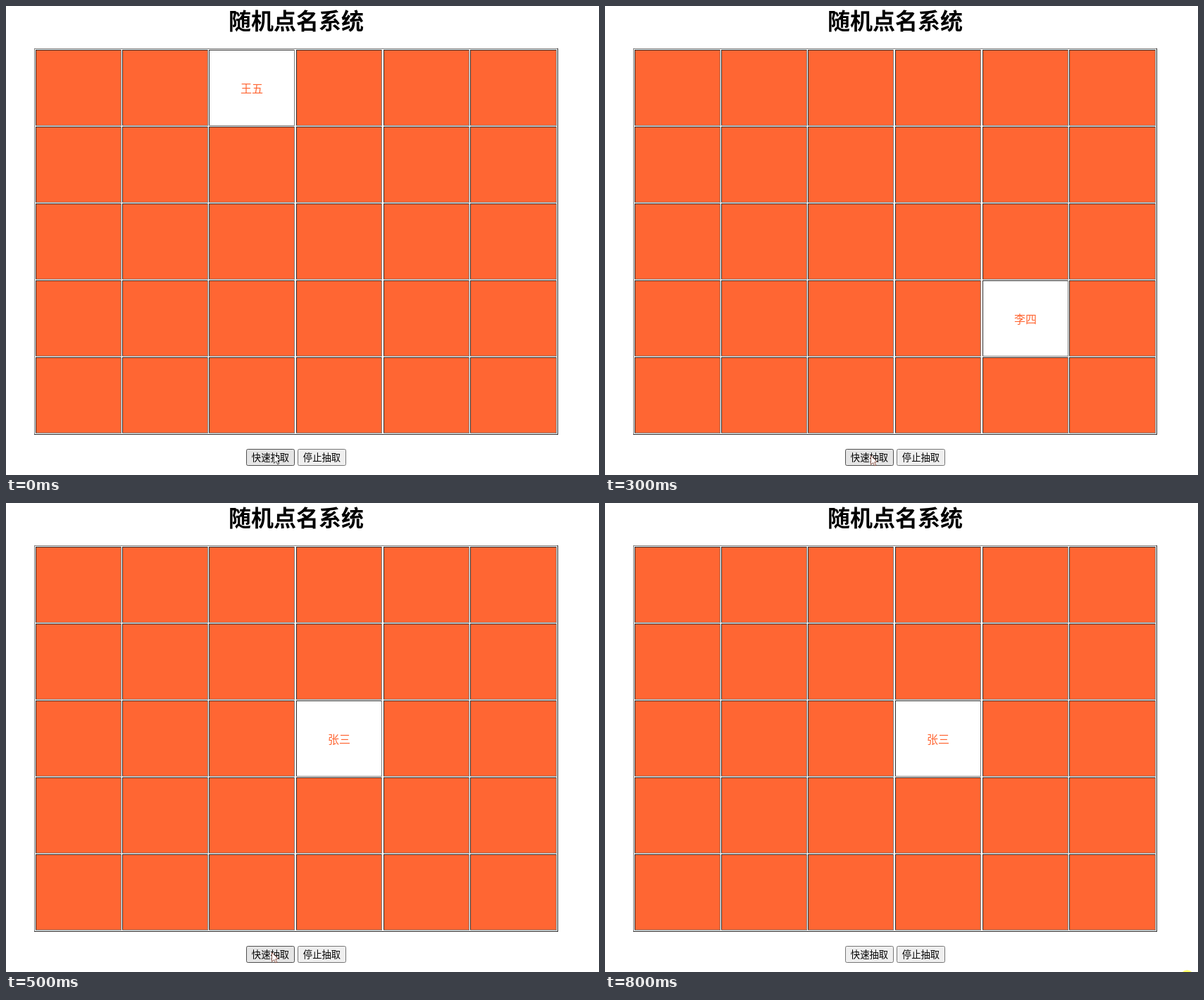
An HTML page with a canvas for the animation above (0.9 s loop, 842x665 px).

```html
<!DOCTYPE html>
<html lang="zh-CN">
<head>
<meta charset="utf-8">
<title>随机点名系统</title>
<style>
  html, body { margin: 0; width: 100%; height: 100%; overflow: hidden; background: #fff; }
  canvas { display: block; }
</style>
</head>
<body>
<canvas id="stage" width="842" height="665"></canvas>
<script>
const ctx = document.getElementById("stage").getContext("2d");
const FONT = '"Noto Sans CJK SC", "Noto Sans CJK", sans-serif';
const ORANGE = "#ff6633", DARK = "#2c2c2c", GRAY = "#808080";
const STEP = 100, LOOP = 900;

const columns = [42, 165, 288, 412, 536, 659];
const names = ["张三", "李四", "王五"];

// The picked cell of each step: [column, row].
const picks = [[2, 0], [1, 2], [2, 1], [4, 3], [3, 1], [3, 2], [2, 3], [4, 3], [3, 2]];

function rect(x, y, w, h, color) {
  ctx.fillStyle = color;
  ctx.fillRect(x, y, w, h);
}

function text(string, x, baseline, size, color, weight = 400) {
  ctx.font = `${weight} ${size}px ${FONT}`;
  ctx.textAlign = "center";
  ctx.fillStyle = color;
  ctx.fillText(string, x, baseline);
}

function bevelBox(x, y, w, h, topLeft, bottomRight, fill) {
  rect(x, y, w, h, bottomRight);
  rect(x, y, w - 1, 1, topLeft);
  rect(x, y, 1, h - 1, topLeft);
  rect(x + 1, y + 1, w - 2, h - 2, fill);
}

function drawTable([pickedColumn, pickedRow]) {
  bevelBox(40, 60, 744, 548, GRAY, DARK, "#fff");
  for (let row = 0; row < 5; row++) {
    columns.forEach((x, column) => {
      const y = 62 + row * 109;
      const width = column === 5 ? 123 : 122;
      const picked = column === pickedColumn && row === pickedRow;
      bevelBox(x, y, width, 108, DARK, GRAY, picked ? "#fff" : ORANGE);
      if (picked) text(names[column % 3], x + 61, y + 60.5, 16, ORANGE);
    });
  }
}

function drawButton(label, x, hovered) {
  ctx.beginPath();
  ctx.roundRect(x + 0.5, 628.5, 68, 23, 2);
  ctx.fillStyle = hovered ? "#e5e5e5" : "#efefef";
  ctx.fill();
  ctx.lineWidth = 1;
  ctx.strokeStyle = hovered ? "#4f4f4f" : "#767676";
  ctx.stroke();
  text(label, x + 34.5, 645, 13.333, "#000");
}

function drawCursor(x, y, outline) {
  ctx.save();
  ctx.translate(x, y);
  ctx.scale(0.8, 0.8);
  ctx.beginPath();
  for (const [px, py] of [[0, 0], [0, 16], [4, 12.5], [6.5, 18], [9, 17], [6.5, 11.5], [11, 11]]) {
    ctx.lineTo(px, py);
  }
  ctx.closePath();
  ctx.fillStyle = "#fff";
  ctx.fill();
  ctx.strokeStyle = outline;
  ctx.stroke();
  ctx.restore();
}

function drawPointerHighlight() {
  ctx.beginPath();
  ctx.arc(826.5, 672, 9.7, 0, Math.PI * 2);
  ctx.fillStyle = "#ffff66";
  ctx.fill();
}

function draw(now) {
  const step = Math.floor((now % LOOP) / STEP);
  const hovering = step < 6;
  rect(0, 0, 842, 665, "#fff");
  text("随机点名系统", 412, 33, 32, "#000", 700);
  drawTable(picks[step]);
  drawButton("快速抽取", 341, hovering);
  drawButton("停止抽取", 414, false);
  if (hovering) {
    const late = step > 2;
    drawCursor(late ? 377.5 : 380.5, late ? 637.5 : 635.5, step ? "#7a3c2c" : "#222");
  }
  if (step === 8) drawPointerHighlight();
}

const start = performance.now();
function tick() {
  draw(performance.now() - start);
  requestAnimationFrame(tick);
}
tick();
</script>
</body>
</html>
```
